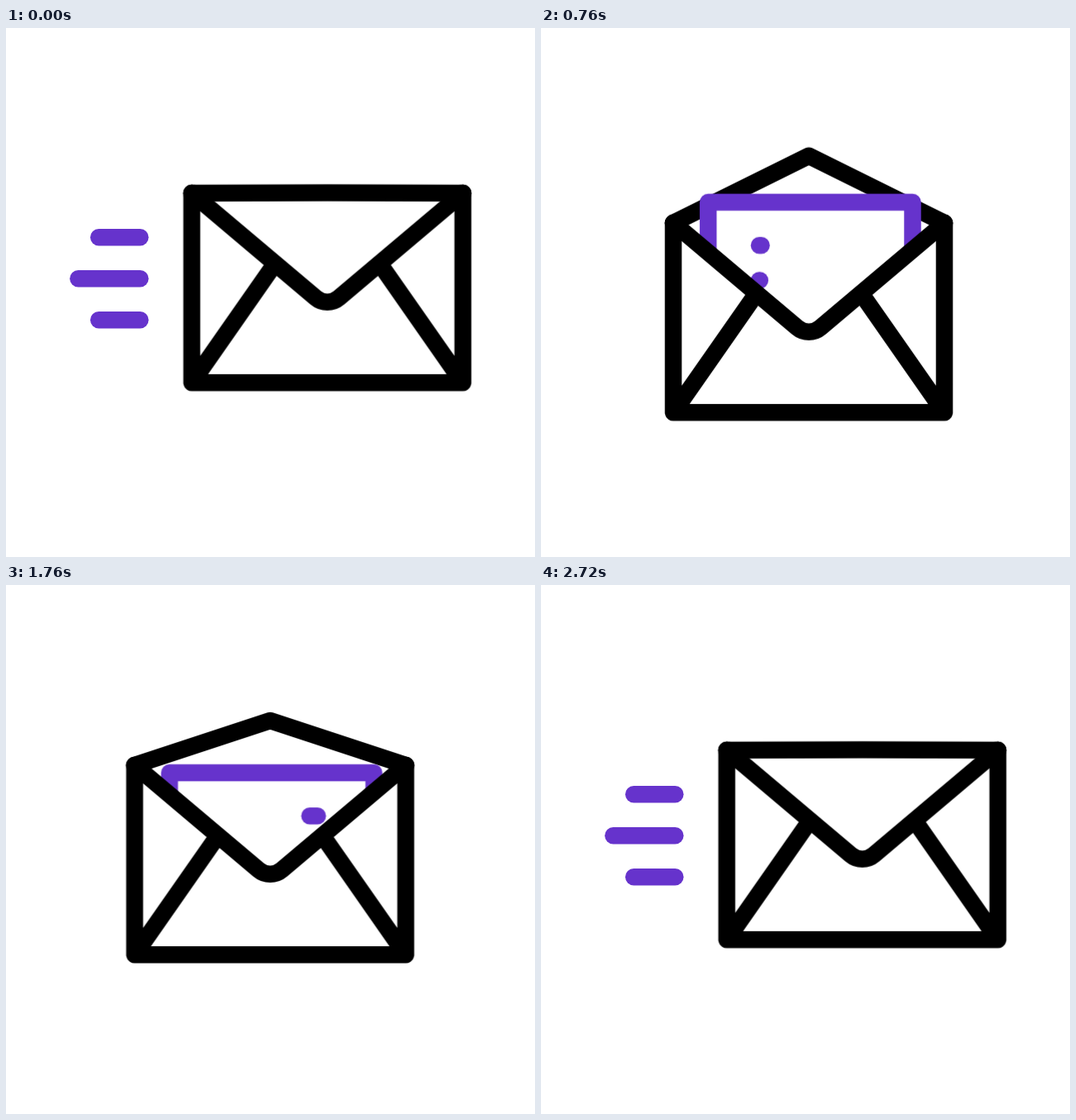
An HTML page without scripts for the animation above (3000 ms loop, 640 by 640 pixels).

```html
<!DOCTYPE html>
<html lang="en">
<head>
<meta charset="utf-8">
<title>Envelope</title>
<style>
  html, body { margin: 0; width: 100%; height: 100%; overflow: hidden; background: #fff; }
  svg { display: block; width: 100%; height: 100%; }

  svg {
    fill: none;
    stroke: #000;
    stroke-width: 20.5;
    stroke-linecap: round;
    stroke-linejoin: round;
  }
  .accent { stroke: #63c; }
  .paper { fill: #fff; }
  .dash { stroke-dasharray: 1 2; }

  /* The timing function here applies to every segment that sets none itself */
  .slide, .lift, .flap, .letter, .wind, .dash {
    animation: 3s cubic-bezier(.5, 0, .5, 1) infinite;
  }
  .slide, .lift { animation-timing-function: cubic-bezier(.62, 0, .16, 1); }
  .flap, .letter { animation-timing-function: cubic-bezier(.5, 0, .29, 1); }
  .slide { animation-name: slide; }
  .lift { animation-name: lift; }
  .flap { animation-name: flap; }
  .letter { animation-name: letter; }
  .wind { animation-name: wind; }
  .gust-short { animation-name: gust-short; }
  .gust-long { animation-name: gust-long; }
  .text-1 { animation-name: text-1; }
  .text-2 { animation-name: text-2; }

  /* Envelope position, one axis per group */
  @keyframes slide {
    0%, 5% { transform: translateX(224.7px); }
    34.33%, 63.77% { transform: translateX(155.6px); animation-timing-function: cubic-bezier(.75, 0, .42, 1); }
    90.37%, 100% { transform: translateX(224.7px); }
  }
  @keyframes lift {
    0%, 5% { transform: translateY(199.8px); }
    34.33%, 47.33% { transform: translateY(238.3px); animation-timing-function: cubic-bezier(.5, 0, .5, 1); }
    69.5%, 100% { transform: translateY(199.8px); }
  }

  @keyframes flap {
    0%, 4.8% { d: path("M0 0L164 -.6L328 0"); }
    35.1%, 47.33% { d: path("M0 0L164 -90L328 0"); }
    77%, 100% { d: path("M0 0L164 -.6L328 0"); }
  }
  @keyframes letter {
    0%, 10.9% { transform: translateY(140px); }
    32.77%, 47.67% { transform: translateY(-46px); animation-timing-function: cubic-bezier(.5, 0, .4, 1); }
    77.67%, 100% { transform: translateY(140px); }
  }

  /* Text lines write from the left, then wipe off to the right */
  @keyframes text-1 {
    0%, 23.33% { stroke-dashoffset: 1.005; }
    38.67%, 47.83% { stroke-dashoffset: 0; }
    62%, 100% { stroke-dashoffset: -1.01; }
  }
  @keyframes text-2 {
    0%, 23.8% { stroke-dashoffset: 1.005; }
    41.33%, 46.33% { stroke-dashoffset: 0; }
    60.67%, 100% { stroke-dashoffset: -1.01; }
  }

  /* Speed lines */
  @keyframes wind {
    0%, 8.3% { transform: none; }
    28.6%, 50% { transform: translateX(-34px); }
    50.1%, 100% { transform: none; }
  }
  @keyframes gust-short {
    0%, 5% { stroke-dashoffset: 0; }
    22.87%, 68.8% { stroke-dashoffset: 1.005; }
    87.47%, 100% { stroke-dashoffset: 0; }
  }
  @keyframes gust-long {
    0%, 5% { stroke-dashoffset: 0; }
    21.73%, 69.67% { stroke-dashoffset: 1.005; }
    88.33%, 100% { stroke-dashoffset: 0; }
  }
</style>
</head>
<body>
<svg viewBox="0 0 640 640">
  <defs>
    <clipPath id="pocket">
      <path d="M0 0L150 126.6A21.7 21.7 0 0 0 178 126.6L328 0V-200H0Z"/>
    </clipPath>
  </defs>

  <g class="wind accent">
    <path class="dash gust-short" pathLength="1" d="M112.2 253.3H162.3"/>
    <path class="dash gust-long" pathLength="1" d="M87.4 303.3H162.3"/>
    <path class="dash gust-short" pathLength="1" d="M112.2 353.3H162.3"/>
  </g>

  <g class="slide">
    <g class="lift">
      <path class="flap" d="M0 0L164 -.6L328 0"/>
      <g clip-path="url(#pocket)">
        <g class="letter accent">
          <rect class="paper" x="42.2" width="247.3" height="220"/>
          <path class="dash text-1" pathLength="1" d="M104 52.3H221.3"/>
          <path class="dash text-2" pathLength="1" d="M104 94.5H221.3"/>
        </g>
      </g>
      <path d="M0 0V229.3H328V0M0 229.3L97 90.5M328 229.3L231 90.5"/>
      <path d="M0 0L150 126.6A21.7 21.7 0 0 0 178 126.6L328 0"/>
    </g>
  </g>
</svg>
</body>
</html>
```
